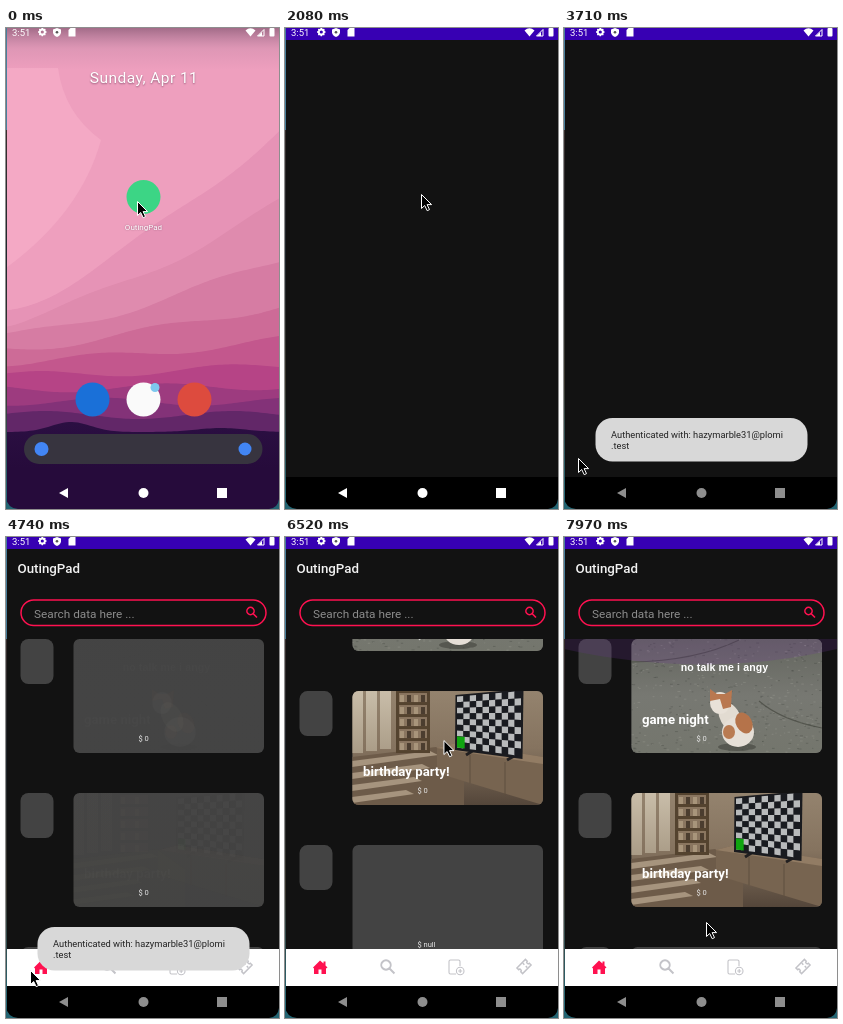
These frames come from a looping animation (273 by 481 pixels, 8 s). An HTML page with a canvas:

```html
<!DOCTYPE html>
<html lang="en">
<head>
<meta charset="utf-8">
<title>Event list demo</title>
<style>
html, body { margin: 0; width: 100%; height: 100%; overflow: hidden; background: #121212; }
canvas { display: block; width: 273px; height: 481px; }
</style>
</head>
<body>
<canvas id="stage" width="273" height="481"></canvas>
<script>
const g = document.getElementById('stage').getContext('2d');
const W = 273, H = 481, LOOP = 8000, STEP = 148.3;
const APP = 'OutingPad', DARK = '#121212', PINK = '#ff1150', CARD = '#434343';
const LAUNCH = 1300, OPENED = 2070, GREY_NAV = 2380, MAIN = 3800, LISTED = 4290, DRAG = 5640;

// Pointer stops: time, x, y
const POINTER = [[0, 131, 173], [590, 130, 163], [1040, 136, 166], [2230, 136, 166],
  [3110, 174, 407], [3710, 14, 430], [4740, 24, 433], [DRAG, 167, 303], [6670, 158, 198], [7970, 142, 385]];

const ramp = (t, from, to) => Math.min(1, Math.max(0, (t - from) / (to - from)));
const mix = (a, b, p) => a + (b - a) * p;
const bump = (x, centre, width) => Math.exp(-(((x - centre) / width) ** 2));

function pointerAt(t) {
  const i = Math.max(1, POINTER.findIndex(k => k[0] >= t));
  const [t0, x0, y0] = POINTER[i - 1], [t1, x1, y1] = POINTER[i];
  const p = (1 - Math.cos(Math.PI * ramp(t, t0, t1))) / 2;
  return [mix(x0, x1, p), mix(y0, y1, p)];
}

function rect(x, y, w, h, color) { g.fillStyle = color; g.fillRect(x, y, w, h); }
function round(x, y, w, h, r, color) {
  g.beginPath(); g.roundRect(x, y, w, h, r); g.fillStyle = color; g.fill();
}
function dot(x, y, r, color, ry = r, tilt = 0) {
  g.beginPath(); g.ellipse(x, y, r, ry, tilt, 0, 7); g.fillStyle = color; g.fill();
}
function line(path, color, width) {
  g.strokeStyle = color; g.lineWidth = width; g.stroke(new Path2D(path));
}
function shape(path, color) { g.fillStyle = color; g.fill(new Path2D(path)); }
function text(s, x, y, font, color, align = 'left', family = 'Roboto') {
  g.font = `${font} ${family}, sans-serif`; g.fillStyle = color; g.textAlign = align;
  g.fillText(s, x, y);
}
function fade(y0, y1, ...colors) {
  const f = g.createLinearGradient(0, y0, 0, y1);
  colors.forEach((c, i) => f.addColorStop(i / (colors.length - 1), c));
  return f;
}
function layer(alpha, draw) {
  if (alpha <= 0) return;
  g.save(); g.globalAlpha *= alpha; draw(); g.restore();
}
function moved(x, y, draw) { g.save(); g.translate(x, y); draw(); g.restore(); }

function statusIcons() {
  const c = '#fff';
  text('3:51', 6, 8, '9.5px', c);
  for (let i = 0; i < 8; i++) {
    const a = i * Math.PI / 4;
    dot(36.3 + 3.4 * Math.cos(a), 4 + 3.4 * Math.sin(a), .9, c);
  }
  g.beginPath(); g.arc(36.3, 4, 2.5, 0, 7); g.lineWidth = 1.8; g.strokeStyle = c; g.stroke();
  shape('M47 1.5L51 0L55 1.5V4.5Q54.5 7.5 51 9Q47.5 7.5 47 4.5Z', c);
  dot(51, 4.3, 1.3, '#555');
  shape('M64.5 0H69.5V8.5H62.5V2Z', c);
  shape('M239.5 2.5Q244.5-2 249.5 2.5L244.5 8.5Z', c);
  line('M251.5 8L258 1.5V8Z', c, 1);
  shape('M252 8L256 4V8Z', c);
  round(263.5, 0, 5, 8.5, 1, c);
}
function navIcons(c) {
  shape('M53 465L62 460V470Z', c);
  dot(137.5, 465, 5, c);
  rect(211, 460, 10, 10, c);
}

function ridge(color, height) {
  g.beginPath(); g.moveTo(0, H);
  for (let x = 0; x <= W; x += 3) g.lineTo(x, height(x));
  g.lineTo(W, H); g.fillStyle = color; g.fill();
}
function wallpaper() {
  const bands = 9;
  rect(0, 0, W, 300, '#ee9fbe');
  shape('M0 40H52Q58 85 95 112Q75 185 0 240Z', '#f4a9c5');
  for (let k = 0; k < bands; k++) {
    const f = k / (bands - 1);
    const color = `hsl(${335 - 40 * f ** 3} ${45 + 18 * (1 - f) ** 3}% ${74 - 46 * f ** 1.3}%)`;
    ridge(color, x => 282 + 105 * f - 180 * (1 - f) ** 3 * (x / W) ** 1.3 + 4 * Math.sin(x / 30 + k * 2));
  }
  ridge(fade(395, 440, '#2b0f42', '#260b3b'), x => 404 - 10 * bump(x, 65, 28) - 4 * bump(x, 215, 35));
  rect(0, 0, W, 42, fade(0, 42, 'rgba(70,45,70,.45)', 'rgba(130,100,130,.14)', 'rgba(130,100,130,0)'));
}

function home(t) {
  const p = ramp(t, 1190, 1480);
  wallpaper();
  moved(0, -p, () => layer(1 - .1 * p, () => {
    g.shadowColor = 'rgba(60,20,50,.5)'; g.shadowBlur = 2; g.shadowOffsetY = .5;
    g.letterSpacing = '.45px';
    text('Sunday, Apr 11', 138, 55, '15.5px', '#fff', 'center');
    g.letterSpacing = '0px';
    if (t < LAUNCH) text(APP, 137.5, 201.5, '8px', '#fff', 'center');
    g.shadowColor = 'transparent';
    ['#1a70d8', '#fafafa', '#dd4b3e'].forEach((c, i) => dot(86.5 + 51 * i, 371.5, 17, c));
    dot(149, 359.5, 4.5, '#7ec8ee');
    round(18, 406, 238.5, 30, 15, '#37343f');
    dot(35.5, 421, 7, '#4285f4');
    dot(239, 421, 6.5, '#4285f4');
  }));
  if (t < LAUNCH) dot(137.5, 169, 17, '#3cd585');
  statusIcons();
  navIcons('#fff');
}

// The launcher icon grows into the window
function opening(t) {
  const p = ramp(t, 1190, 1930);
  const w = mix(34, W, p ** 2.7), h = mix(34, H, p ** 3.24), cy = mix(169, H / 2, p);
  const dark = ramp(p, .4, .8);
  g.save();
  g.beginPath(); g.roundRect(137 - w / 2, cy - h / 2, w, h, Math.min(w / 2, 25 * (1 - dark * .6))); g.clip();
  rect(0, 0, W, H, '#55a57d');
  layer(dark, () => rect(0, 0, W, H, DARK));
  g.restore();
}

function lens(x, y, r, color, width) {
  g.beginPath(); g.arc(x, y, r, Math.PI / 4, Math.PI * 2.25);
  g.lineTo(x + r * 1.8, y + r * 1.8);
  g.strokeStyle = color; g.lineWidth = width; g.stroke();
}

function catPhoto() {
  rect(0, 0, 191, 114, fade(0, 114, '#63655e', '#777872', '#74766d'));
  let seed = 7;
  const rnd = () => (seed = seed * 16807 % 2147483647) / 2147483647;
  for (let i = 0; i < 500; i++)
    rect(rnd() * 191, rnd() * 114, 1 + rnd() * 2, 1, i % 2 ? 'rgba(40,42,36,.22)' : 'rgba(190,190,180,.2)');
  line('M0 23Q65 22 108 1M128 62Q150 81 191 89', 'rgba(50,52,44,.5)', 1.2);
  dot(106, 108, 19, 'rgba(40,40,35,.4)', 4);
  dot(99, 78, 10, '#e2dbd1', 16, -.5);
  dot(107, 93, 16, '#e6dfd7', 15);
  dot(113, 84, 8, '#b5734a', 11, -.5);
  dot(98, 93, 6, '#b97b52', 7);
  dot(89, 64, 10, '#e8e1d8', 11);
  shape('M79 62L79 50L86 55L94 55L101 51L100 68L92 70L89 60Z', '#b97850');
  g.letterSpacing = '.1px';
  text('no talk me i angy', 93.5, 31.5, 'bold 10.6px', '#fff', 'center', 'Liberation Sans');
}

function roomPhoto() {
  rect(0, 0, 191, 114, fade(0, 114, '#94836e', '#85735f', '#54463a'));
  for (let i = 0; i < 3; i++) rect(i * 14, 0, 11, 62 - i * 2, fade(0, 62, '#c9bda9', '#aa9c87'));
  shape('M0 66L84 56L112 76V114H0Z', '#6d5b49');
  for (let i = 0; i < 4; i++) shape(`M0 ${70 + i * 12}L${78 - i * 8} ${60 + i * 13}l8 4L0 ${76 + i * 12}Z`, '#a6947e');
  rect(44, 0, 34, 62, '#54432f');
  for (let i = 0; i < 5; i++) {
    rect(47, 2 + i * 12, 28, 9, '#8a7660');
    for (let k = 0; k < 4; k++) rect(48 + k * 7, 4 + i * 12, 4, 7, k % 2 ? '#4b3d2f' : '#a8957b');
  }
  shape('M85 57L104 52L191 66V114L85 82Z', '#776450');
  shape('M85 57L104 52L191 66V73Z', '#927c64');
  line('M118 64V92M153 71V104', '#5e4e3e', 1);
  line('M114 64L122 59M155 69L164 64', '#211f20', 3);
  shape('M103.5 4L171.5-2L170.5 68L103 59Z', '#1a1b1f');
  // Checkerboard in slight perspective
  const point = (u, v) => [105 + 64 * u, 5.5 * (1 - u) + v * (51 + 14 * u)];
  const cell = (u, v, w, h, color) => {
    g.beginPath();
    [[u, v], [u + w, v], [u + w, v + h], [u, v + h]].forEach(p => g.lineTo(...point(...p)));
    g.fillStyle = color; g.fill();
  };
  for (let i = 0; i < 10; i++) for (let j = 0; j < 9; j++)
    cell(i / 10, j / 9, .1, 1 / 9, (i + j) % 2 ? '#191b20' : '#b8babb');
  cell(0, .78, .12, .22, '#10a510');
}

function card(y, title, photo, shown) {
  round(14.5, y, 33, 45, 8, CARD);
  round(67.5, y, 190.5, 114, 6, CARD);
  if (photo) layer(shown, () => {
    g.beginPath(); g.roundRect(67.5, y, 190.5, 114, 6); g.clip();
    moved(67, y, photo);
    text(title, 78, y + 84.5, 'bold 13.2px', '#fff');
  });
  text(photo && shown ? '$ 0' : '$ null', 132.5, y + 102, '7.5px', '#e8e8e8');
}

function list(t, pointerY) {
  const pull = t > DRAG ? pointerY - 303 : 0;
  const scroll = Math.max(0, -pull * 1.02);
  const shown = ramp(t, 4740, 5040);
  g.save();
  g.beginPath(); g.rect(0, 102, W, 310); g.clip();
  card(102 - scroll, 'game night', catPhoto, shown);
  card(256 - scroll, 'birthday party!', roomPhoto, shown);
  card(410 - scroll);
  if (pull > 0) {
    const glow = pull / 82, edge = 102 + 10 * glow;
    g.beginPath(); g.moveTo(0, 102); g.lineTo(0, edge);
    g.quadraticCurveTo(140, edge + 31 * glow, W, edge);
    g.lineTo(W, 102); g.fillStyle = `rgba(105,50,145,${.22 * glow})`; g.fill();
  }
  g.restore();
}

function tabs() {
  const c = '#c3c3c8';
  rect(0, 412, W, 37, '#fff');
  shape('M28 430.5L35 423.5L38.5 426.5V424.5H40.5V428.5L42.5 430.5L41 431.5V437H36.5V432.5H33.5V437H29V431.5Z', PINK);
  lens(101, 428, 4.7, c, 2);
  line('M171 437H165.5Q164 437 164 435.5V424.5Q164 423 165.5 423H173.5Q175 423 175 424.5V429M175.2 432V436M173.2 434H177.2', c, 1.1);
  g.beginPath(); g.arc(175.2, 434, 3.8, 0, 7); g.stroke();
  moved(239, 429.5, () => {
    g.rotate(-Math.PI / 4);
    line('M-6-4H6V-1.5A1.5 1.5 0 0 0 6 1.5V4H-6V1.5A1.5 1.5 0 0 0-6-1.5ZM1.5-3V-1M1.5 1V3', c, 1.5);
  });
}

function mainScreen(t, pointerY) {
  text(APP, 11.5, 35.5, '500 13.3px', '#f2f2f2');
  g.beginPath(); g.roundRect(15, 63, 245, 25.5, 12.75);
  g.strokeStyle = PINK; g.lineWidth = 1.5; g.stroke();
  text('Search data here ...', 28, 80.5, '11.8px', '#8c8c8c');
  lens(244.5, 74, 3.6, PINK, 1.6);
  if (t > LISTED) list(t, pointerY);
  tabs();
}

function app(t, pointerY) {
  rect(0, 0, W, H, DARK);
  rect(0, 0, W, 12, '#3700b3');
  layer(ramp(t, MAIN, MAIN + 300), () => mainScreen(t, pointerY));
  rect(0, 449, W, 32, '#000');
  statusIcons();
  navIcons(t < GREY_NAV ? '#fff' : '#8e8e8e');
  layer(ramp(t, 2960, 3175) * (1 - ramp(t, 4890, 5190)), () => {
    round(31.5, 390, 212, 43.5, 17, '#d8d8d8');
    text('Authenticated with: hazymarble31@plomi', 47, 410, '9.3px', '#222');
    text('.test', 47, 420.5, '9.3px', '#222');
  });
}

// Desktop showing around the phone screen
function edges() {
  rect(0, 0, 1, 102, '#487f9c');
  rect(0, 102, 1, 379, fade(102, 481, '#39302f', '#20272d', '#3b382f', '#267080'));
  shape('M0 469Q1 480 12 481H0ZM273 471Q272 480 263 481H273Z', '#236472');
}

function pointer(x, y) {
  moved(x, y, () => {
    const arrow = 'M.5 .5V14.5L3.7 11.5L6.2 16.7L8.5 15.6L6.1 10.6H10.6Z';
    shape(arrow, '#000');
    line(arrow, '#fff', 1);
  });
}

function frame(now) {
  const clock = now % LOOP;
  const t = clock >= 7970 ? 7970 : Math.floor((clock + 8) / STEP) * STEP;
  const [x, y] = pointerAt(t);
  if (t < OPENED) {
    home(t);
    if (t > LAUNCH) opening(t);
  } else app(t, y);
  edges();
  pointer(x, y);
}

let start;
function tick(now) {
  start ??= now;
  frame(now - start);
  requestAnimationFrame(tick);
}
frame(0);
requestAnimationFrame(tick);
</script>
</body>
</html>
```
